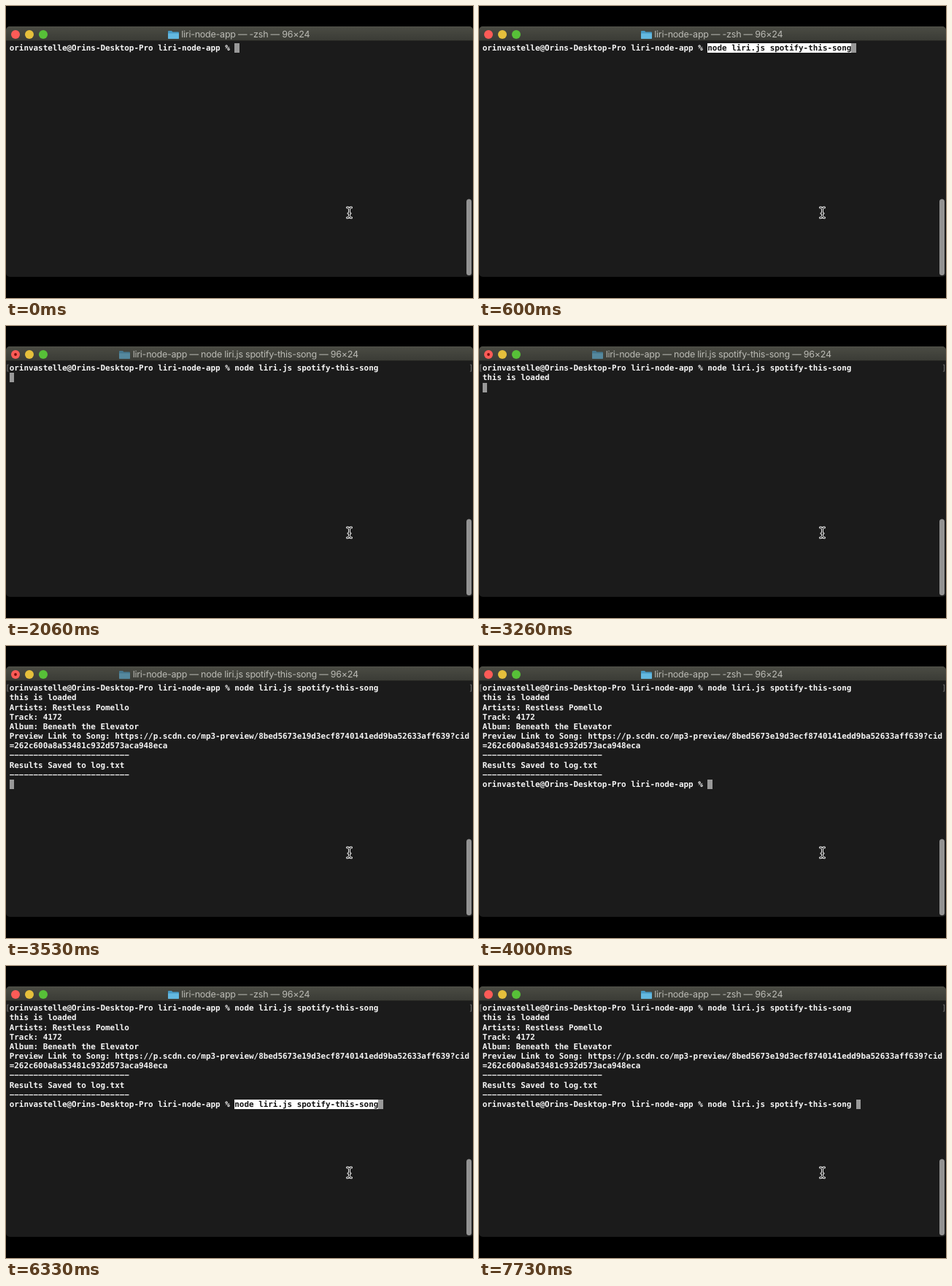
These frames come from a looping animation (640x400 px, 8000 ms). An HTML page:

```html
<!DOCTYPE html>
<html lang="en">
<head>
<meta charset="utf-8">
<title>Terminal</title>
<style>
html, body { margin: 0; width: 100%; height: 100%; overflow: hidden; background: #000; }
#stage { position: relative; width: 640px; height: 400px; overflow: hidden; text-rendering: geometricPrecision; }
#window { position: absolute; top: 28px; width: 640px; height: 343px; border-radius: 5px; background: #1b1b1b; overflow: hidden; }
#bar { height: 20px; background: linear-gradient(#55564e 0, #4a4b43 1px, #3b3c36 19px, #262622 19px); }
#title { position: absolute; top: 1px; width: 638px; height: 21px; display: flex; justify-content: center; align-items: center;
  font: 12.5px/21px Inter, sans-serif; letter-spacing: -.23px; color: #bbbbb5; white-space: pre; }
#title svg { width: 15px; height: 13px; margin-right: 3.5px; }
.busy svg { opacity: .6; }
#screen, .mark { position: absolute; top: 51.25px; margin: 0; font: bold 10.92px/13.15px "DejaVu Sans Mono", monospace; color: #f6f6f6; white-space: pre; }
#screen { left: 4.7px; }
.mark { font-weight: normal; color: #777; }
.paste { background: #fff; color: #111; }
.cursor { background: #999; }
#overlay { position: absolute; inset: 0; }
</style>
</head>
<body>
<div id="stage">
  <div id="window">
    <div id="bar"></div>
    <div id="title">
      <svg viewBox="0 0 15 13"><path d="M0 2q0-1 1-1h4l1.5 1.5H14q1 0 1 1V11q0 1-1 1H1q-1 0-1-1z" fill="#4699c4"/><path d="M0 4.5h15V11q0 1-1 1H1q-1 0-1-1z" fill="#63b8e0"/></svg><span id="name"></span>
    </div>
  </div>
  <div class="mark" style="left:-1px">[</div>
  <div class="mark" style="left:634px">]</div>
  <pre id="screen"></pre>
  <svg id="overlay" width="640" height="400">
    <circle cx="13" cy="39" r="6" fill="#fc5b57"/>
    <circle cx="32" cy="39" r="6" fill="#e5bf3c"/>
    <circle cx="51" cy="39" r="6" fill="#57c038"/>
    <circle id="dot" cx="13" cy="39" r="1.9" fill="#7c0d0b"/>
    <rect x="631" y="264.5" width="7" height="104.5" rx="3.5" fill="#939393"/>
    <g fill="none" stroke-linecap="round">
      <defs><path id="beam" d="M467.5 276q3 0 3 2.5q0-2.5 3-2.5M470.5 278v10M467.5 290q3 0 3-2.5q0 2.5 3 2.5M469 284h3"/></defs>
      <use href="#beam" stroke="#eee" stroke-width="3"/>
      <use href="#beam" stroke="#111"/>
    </g>
  </svg>
</div>
<script>
const $ = id => document.getElementById(id);
const LOOP = 8000;
const prompt = "orinvastelle@Orins-Desktop-Pro liri-node-app % ";
const command = "node liri.js spotify-this-song";
const cursor = '<span class="cursor"> </span>';
const pasted = `<span class="paste">${command}</span>`;
const rule = "−".repeat(25); // minus signs, wider than hyphens
const started = prompt + command + "\n";
const loaded = started + "this is loaded\n";
const results = loaded + [
  "Artists: Restless Pomello",
  "Track: 4172",
  "Album: Beneath the Elevator",
  "Preview Link to Song: https://p.scdn.co/mp3-preview/8bed5673e19d3ecf8740141edd9ba52633aff639?cid",
  "=262c600a8a53481c932d573aca948eca",
  rule, "Results Saved to log.txt", rule, ""
].join("\n");

// Start time in ms and screen content
const steps = [
  [0, prompt],
  [600, prompt + pasted],
  [1860, started],
  [3060, loaded],
  [3530, results],
  [3600, results + prompt],
  [6330, results + prompt + pasted],
  [7330, results + prompt + command + " "]
];
const marks = document.querySelectorAll(".mark");
let shown = "";

function draw(t) {
  const text = steps.findLast(([start]) => start <= t)[1];
  const busy = t >= 2000 && t < 3660;
  if (shown === text + busy) return;
  shown = text + busy;
  $("screen").innerHTML = text + cursor;
  $("name").textContent = `liri-node-app — ${busy ? command : "-zsh"} — 96×24`;
  $("title").className = busy ? "busy" : "";
  $("dot").style.display = busy ? "" : "none";
  marks.forEach(m => m.style.visibility = t >= 1860 ? "visible" : "hidden");
}

const origin = performance.now();
function tick() {
  draw((performance.now() - origin) % LOOP);
  requestAnimationFrame(tick);
}
tick();
</script>
</body>
</html>
```
